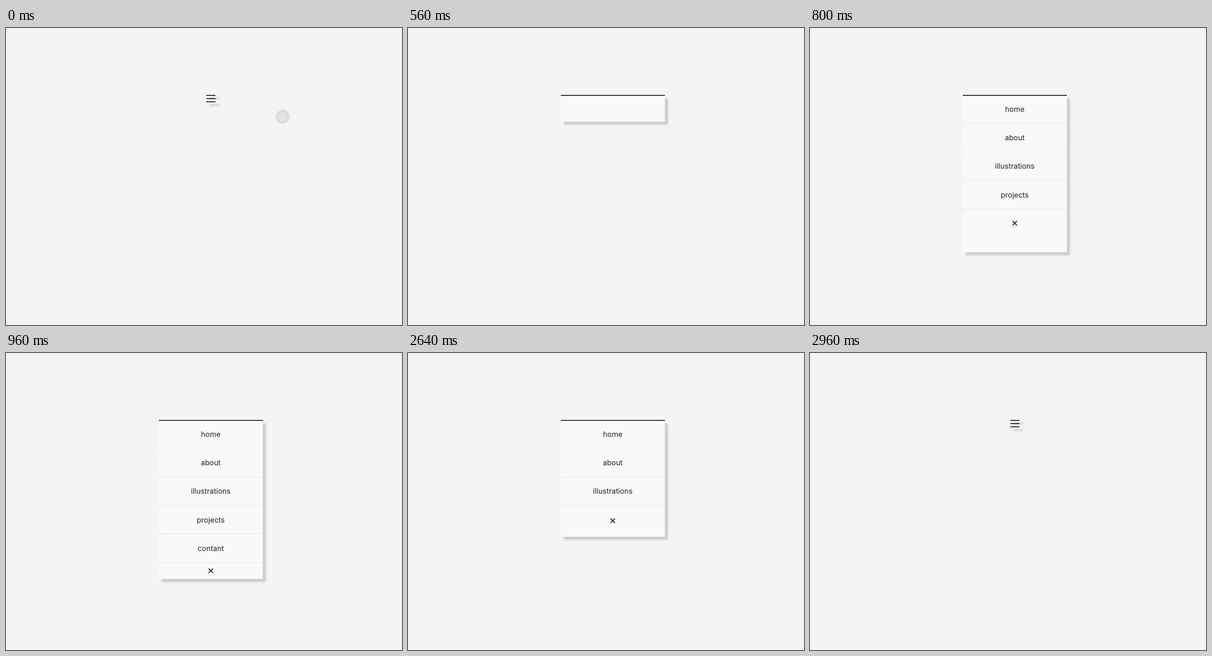
These frames come from a looping animation (864 px wide and 648 px high, 4.56 s). An HTML page:

```html
<!DOCTYPE html>
<html lang="en">
<head>
<meta charset="utf-8">
<title>Dropdown menu</title>
<style>
  html, body { margin: 0; width: 100%; height: 100%; overflow: hidden; background: #f4f4f4; }
  svg { display: block; width: 100vw; height: 100vh; }
  text { font: 400 16px Inter, sans-serif; fill: #222; text-anchor: middle; }
  .ink { fill: #222528; }
  .rule { fill: #e5e6e6; }
</style>
</head>
<body>
<svg viewBox="0 0 864 648">
  <defs>
    <filter id="soft" filterUnits="userSpaceOnUse" x="300" y="120" width="340" height="420">
      <feGaussianBlur stdDeviation="2.2"/>
    </filter>
    <filter id="halo" x="-50%" y="-50%" width="200%" height="200%">
      <feGaussianBlur stdDeviation="2"/>
    </filter>
    <clipPath id="fold"><rect id="foldBox" x="333" y="140" width="228" height="0"/></clipPath>
  </defs>

  <g id="bars">
    <g filter="url(#soft)" fill="#a9adac" opacity=".75">
      <rect x="444" y="152.5" width="21" height="3"/>
      <rect x="444" y="166.5" width="21" height="3"/>
    </g>
    <rect class="ink" x="437" y="153" width="20" height="2"/>
    <rect class="ink" x="437" y="160" width="20" height="2"/>
  </g>

  <g id="panel">
    <rect id="shade" filter="url(#soft)" fill="#c8cccb"/>
    <rect id="sheet" fill="#f9f9f9"/>
    <g id="items" clip-path="url(#fold)"></g>
    <path id="cross" d="M-4.8-4.8 4.8 4.8M4.8-4.8-4.8 4.8" stroke="#222528" stroke-width="2"/>
  </g>
  <rect id="line" class="ink" y="146" height="2"/>

  <g id="cursor">
    <circle cx=".8" cy=".8" r="12.5" fill="none" stroke="#000" stroke-opacity=".22" stroke-width="2.5" filter="url(#halo)"/>
    <circle r="12" fill="#dcdcdc" fill-opacity=".64" stroke="#c8c8c8" stroke-opacity=".6"/>
  </g>
</svg>
<script>
const LOOP = 4560, STEP = 80;
const MID = 446.8, PITCH = 62.4;
const $ = id => document.getElementById(id);
const set = (id, attrs) => {
  for (const k in attrs) $(id).setAttribute(k, attrs[k]);
};
const show = (id, on) => set(id, { visibility: on ? 'visible' : 'hidden' });
const mix = (a, b, p) => a + (b - a) * p;

// Symmetric ease-in-out of the given power between two times.
function ease(t, from, to, power) {
  const u = Math.min(1, Math.max(0, (t - from) / (to - from)));
  return u < .5 ? (2 * u) ** power / 2 : 1 - (2 - 2 * u) ** power / 2;
}

$('items').innerHTML = ['home', 'about', 'illustrations', 'projects', 'contant']
  .map((word, i) => `<text x="${MID}" y="${182.5 + i * PITCH}">${word}</text>
    <rect class="rule" x="334" y="${Math.floor(207.7 + i * PITCH)}" width="226" height="1"/>`)
  .join('');

function drawCursor(t) {
  const opening = t <= 400, closing = t >= 2400 && t < 2560;
  show('cursor', opening || closing);
  const p = ease(t, 0, 400, 3);
  const x = opening ? mix(603.5, 447, p) : 446.5;
  const y = opening ? mix(193, 160, p) : 479.5;
  const press = t === 400 || t === 2480 ? .9 : 1;
  set('cursor', { transform: `translate(${x} ${y}) scale(${press})` });
}

function drawMenu(t) {
  const open = t > 400 && t < 2960;
  const wide = open ? ease(t, 400, 560, 2) : 0;
  const left = mix(437, 333.5, wide), width = mix(20, 227, wide);
  set('line', { x: left, width });
  show('bars', !open);
  $('panel').style.display = open ? '' : 'none';
  if (!open) return;

  const early = t < 2400;
  const bottom = early
    ? mix(162, 493, ease(t, 480, 820, 1.8))
    : mix(493, 174, ease(t, 2480, 2880, 2.47));
  const crossY = early
    ? mix(154, 475, ease(t, 480, 960, 2.92))
    : mix(475, 163, ease(t, 2480, 2880, 1.61));
  const fold = mix(128, 460, (crossY - 154) / 321);

  const size = { width, height: bottom - 147 };
  set('sheet', { x: left, y: 147, ...size });
  set('shade', { x: left + 6.5, y: 153.5, ...size });
  set('foldBox', { height: Math.max(0, fold - 140) });
  set('cross', { transform: `translate(${MID} ${crossY})` });
  $('cross').style.display = crossY > 172 ? '' : 'none';
}

const start = performance.now();
function tick() {
  const now = (performance.now() - start) % LOOP;
  const t = Math.floor((now + 1) / STEP) * STEP % LOOP;
  drawCursor(t);
  drawMenu(t);
  requestAnimationFrame(tick);
}
tick();
</script>
</body>
</html>
```
